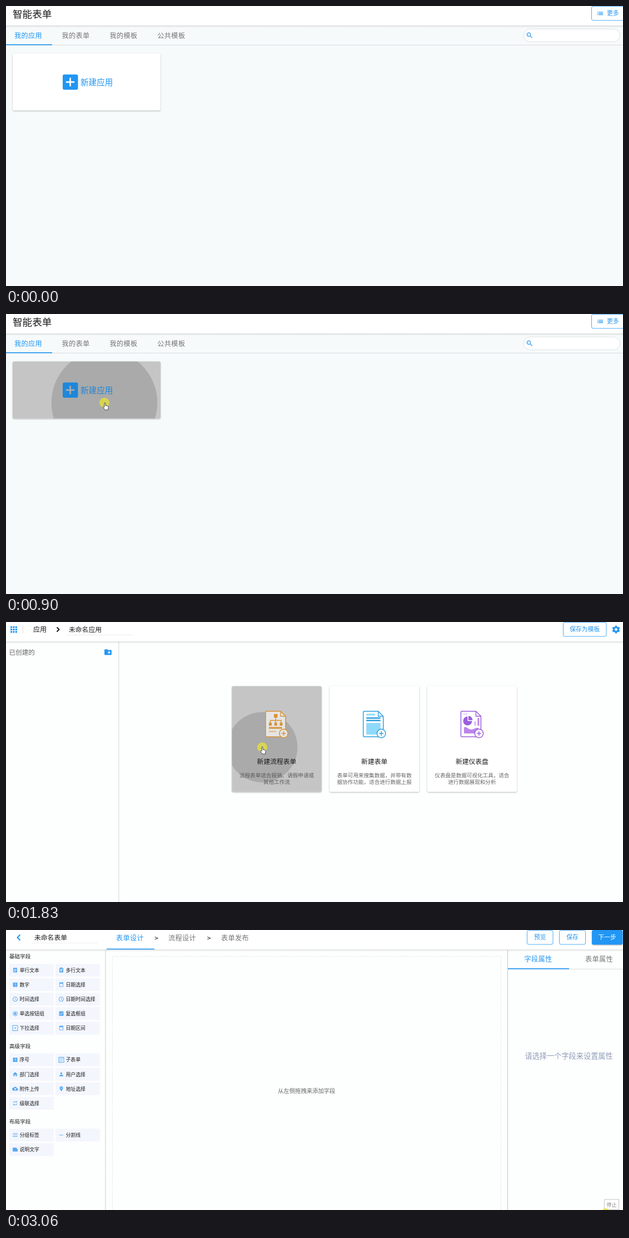
An HTML page for the animation above (3140 ms loop, 1110x505 px).

```html
<!DOCTYPE html>
<html lang="zh-CN">
<head>
<meta charset="utf-8">
<style>
  html, body { margin: 0; width: 100%; height: 100%; overflow: hidden; background: #fff; }
  #stage { display: block; }
  text { font-family: "Noto Sans CJK SC", "Noto Sans CJK", "Noto Sans", sans-serif; font-weight: 300; }
  .paper { filter: drop-shadow(0 1px 1px rgba(0, 0, 0, .28)); }
</style>
</head>
<body>
<svg id="stage" width="1110" height="505" viewBox="0 0 1110 505"></svg>
<script>
const LOOP = 3140;
const BLUE = '#2196f3', INK = '#1c1c1c', GRAY = '#757575', RULE = '#dcdcdc';

// ---------- drawing helpers: each returns SVG markup ----------
const rect = (x, y, w, h, fill, extra = '') =>
  `<rect x="${x}" y="${y}" width="${w}" height="${h}" fill="${fill}" ${extra}/>`;
const circle = (x, y, r, fill, extra = '') =>
  `<circle cx="${x}" cy="${y}" r="${r}" fill="${fill}" ${extra}/>`;
const line = (d, stroke, width = 1, extra = '') =>
  `<path d="${d}" fill="none" stroke="${stroke}" stroke-width="${width}" ${extra}/>`;
const shape = (d, fill) => `<path d="${d}" fill="${fill}" fill-rule="evenodd"/>`;

// cy is the visual middle of the characters
const text = (str, x, cy, size, fill = INK, anchor = 'start', extra = '') =>
  `<text x="${x}" y="${cy + size * 0.38}" font-size="${size}" fill="${fill}" text-anchor="${anchor}" ${extra}>${str}</text>`;
const tab = (str, x, cy, fill) => text(str, x, cy, 12.2, fill, 'start', 'letter-spacing=".35"');

const icon = (name, cx, cy, size, fill = BLUE) =>
  `<g transform="translate(${cx - size / 2} ${cy - size / 2}) scale(${size / 24})">${shape(ICONS[name], fill)}</g>`;
const outlineButton = (str, x, w, size = 10.8) =>
  rect(x, 0.5, w, 25.5, '#fff', `rx="3" stroke="${BLUE}" stroke-opacity=".8"`) +
  text(str, x + w / 2, 13.3, size, BLUE, 'middle');
const header = () => rect(0, 0, 1110, 35, '#fff') + rect(0, 35, 1110, 4, 'url(#shade)');

// A card that darkens under its content and shows a growing ripple when pressed
const card = (id, x, y, w, h, content, rippleX = 0, rippleY = 0) => `
  ${rect(x, y, w, h, '#fff', 'rx="3" class="paper"')}
  <svg id="${id}-under" x="${x}" y="${y}" width="${w}" height="${h}">
    ${rect(0, 0, w, h, '#000', 'rx="3" opacity=".14"')}
    ${circle(rippleX - x, rippleY - y, 0, '#000', `id="${id}-ripple" opacity=".137"`)}
  </svg>
  ${content}
  ${rect(x, y, w, h, '#000', `rx="3" opacity=".1" id="${id}-over"`)}`;

const RING = 'M12 2a10 10 0 1 0 .01 0zm0 2a8 8 0 1 1-.01 0z';
const FRAME = 'M1 1h22v22H1zM3 3v18h18V3z';
const ICONS = {
  list: 'M1 6h3v2.5H1zm5 0h17v2.5H6zM1 11h3v2.5H1zm5 0h17v2.5H6zM1 16h3v2.5H1zm5 0h17v2.5H6z',
  search: 'M15.5 14h-.8l-.3-.3A6.5 6.5 0 1 0 13.7 14.4l.3.3v.8l5 5 1.5-1.5zm-6 0a4.5 4.5 0 1 1 .01 0z',
  folder: 'M20 6h-8l-2-2H4a2 2 0 0 0-2 2v12a2 2 0 0 0 2 2h16a2 2 0 0 0 2-2V8a2 2 0 0 0-2-2zm-1 8h-3v3h-2v-3h-3v-2h3V9h2v3h3z',
  event: 'M20 3h-3V1h-2v2H9V1H7v2H4v18h16zM7 8h10v2H7zm0 4h10v2H7zm0 4h6v2H7z',
  clip: 'M20 3h-5a3 3 0 0 0-6 0H4v18h16zM7 7h10v2H7zm0 4h10v2H7zm0 4h7v2H7z',
  one: 'M3 3h18v18H3zM10 7v2h2v8h2V7z',
  calendar: 'M20 3h-3V1h-2v2H9V1H7v2H4v18h16zM6 8h12v11H6z',
  clock: RING + 'M11 7h1.5v5.2l4.5 2.7-.8 1.2L11 13z',
  radio: RING + 'M12 7a5 5 0 1 0 .01 0z',
  check: 'M3 3h18v18H3zM10 17l9-9-1.4-1.4-7.6 7.6-3.6-3.6L5 12z',
  select: FRAME + 'M7 10h10l-5 5z',
  subform: FRAME + 'M5 6h5v2H5zm7 0h7v2h-7zM5 11h5v2H5zm7 0h7v2h-7zM5 16h9v2H5z',
  home: 'M10 20v-6h4v6h5v-8h3L12 3 2 12h3v8z',
  person: 'M12 12a4 4 0 1 0 0-8 4 4 0 0 0 0 8zm0 2c-2.7 0-8 1.3-8 4v2h16v-2c0-2.7-5.3-4-8-4z',
  upload: 'M19.4 10A7.5 7.5 0 0 0 5.4 8 6 6 0 0 0 6 20h13a5 5 0 0 0 .4-10zM14 13v4h-4v-4H7l5-5 5 5z',
  place: 'M12 2a7 7 0 0 0-7 7c0 5.3 7 13 7 13s7-7.7 7-13a7 7 0 0 0-7-7zm0 9.5a2.5 2.5 0 1 1 .01 0z',
  repeat: 'M7 7h10v3l4-4-4-4v3H5v6h2zm10 10H7v-3l-4 4 4 4v-3h12v-6h-2z',
  lines: 'M2 5h20v2H2zm0 6h20v2H2zm0 6h20v2H2z',
  minus: 'M4 11h16v2H4z',
  note: 'M2 4h14l6 6v10H2z'
};

// ---------- scene 1: application list ----------
function homeScene() {
  const newApp =
    shape('M105 123.5h21.5a3 3 0 0 1 3 3v21.5a3 3 0 0 1-3 3h-21.5a3 3 0 0 1-3-3v-21.5a3 3 0 0 1 3-3z' +
          'M114.2 129.5v6.3h-6.3v2.7h6.3v6.3h2.7v-6.3h6.3v-2.7h-6.3v-6.3z', BLUE) +
    text('新建应用', 134, 137.3, 14.6, BLUE);
  return rect(0, 0, 1110, 505, '#f6fafb') + header() +
    text('智能表单', 12, 14.3, 17.6) +
    rect(1053.5, 0.5, 70, 25.5, '#fff', `rx="3" stroke="${BLUE}" stroke-opacity=".8"`) +
    icon('list', 1069, 13.2, 11) + text('更多', 1081, 13.3, 10.8, BLUE) +
    tab('我的应用', 15, 53.5, BLUE) +
    ['我的表单', '我的模板', '公共模板'].map((s, i) => tab(s, 100.5 + i * 85.9, 53.5, GRAY)).join('') +
    line('M0 70.5H1110', RULE) + rect(0, 69, 83, 1.6, BLUE) +
    rect(931.5, 41.5, 173, 23, '#fff', 'rx="11.5" stroke="#e0e3e4"') + icon('search', 942, 53, 14) +
    card('app', 12, 85.5, 266, 103, newApp, 177, 160);
}

// ---------- scene 2: choose what to create ----------
function documentIcon(x, color, content) {
  return `<g transform="translate(${x} 161)">
    <path d="M2 0H27L36 9V44a2 2 0 0 1-2 2H2a2 2 0 0 1-2-2V2a2 2 0 0 1 2-2z" fill="#fff" stroke="${color}" stroke-width="1.5"/>
    ${line('M27 0V9H36', color, 1.4)}${content}
    ${circle(32.5, 40, 7.7, '#fff', `stroke="${color}" stroke-width="1.5"`)}
    ${line('M28.5 40h8M32.5 36v8', color, 1.5)}</g>`;
}

const flowIcon = c => rect(15, 5, 6.5, 6.5, c) + line('M18.2 11V22M8.5 22V16.5H28V22', c, 1.4) +
  [6, 15.7, 25.5].map(x => rect(x, 20.5, 5, 5.5, c)).join('') +
  rect(6, 28.5, 23.5, 3, c) + rect(6, 35, 13, 3, '#fbdcae');
const formIcon = c => rect(5.5, 4.5, 16, 3, '#90d9fa') + rect(5.5, 11, 25.5, 2.5, c) +
  rect(5.5, 15.5, 25.5, 2.5, c) + rect(5.5, 21, 25.5, 21, '#90d9fa');
const chartIcon = c => circle(6, 5, 1.3, '#d9b8f3') + circle(10, 5, 1.3, '#d9b8f3') +
  shape('M12 9.5a8 8 0 1 0 8 8H12z', c) + shape('M13.5 8.5a7.5 7.5 0 0 1 7.5 7.5h-7.5z', c) +
  rect(24, 18, 3, 8, '#d9b8f3') + rect(30, 12, 3, 14, '#bd85ea') +
  shape('M5.5 29c5-2 8 4 13 4s8-4 13-3V40H5.5z', '#bd85ea');

function chooseScene() {
  const choices = [
    ['新建流程表单', '#f0a33c', flowIcon, '流程表单适合报销、请假申请或', '其他工作流'],
    ['新建表单', '#2d9fe0', formIcon, '表单可用来搜集数据，并带有数', '据协作功能，适合进行数据上报'],
    ['新建仪表盘', '#9b5fdc', chartIcon, '仪表盘是数据可视化工具，适合', '进行数据展现和分析']
  ];
  const dots = [0, 1, 2].flatMap(r => [0, 1, 2].map(c => rect(8 + c * 4.4, 7.7 + r * 4.3, 3.1, 3.1, BLUE))).join('');
  const gear = circle(1097.5, 13.5, 4, 'none', `stroke="${BLUE}" stroke-width="3.2"`) +
    circle(1097.5, 13.5, 6, 'none', `stroke="${BLUE}" stroke-width="2.2" pathLength="12" stroke-dasharray="1 1" stroke-dashoffset="-.5"`);
  return rect(0, 0, 1110, 505, '#fdfefe') + line('M202.8 36V505', RULE, 1.2) + header() +
    dots + line('M30.5 7V20', RULE) + text('应用', 49, 13.3, 12.1) +
    line('M91.5 9.5l4 4-4 4', '#111', 1.8) +
    text('未命名应用', 113, 13.5, 11.8) + line('M109 23.5H228', '#ececec') +
    outlineButton('保存为模板', 1002.5, 77.5) + gear +
    text('已创建的', 5.5, 55, 11.6, '#666') + icon('folder', 183.5, 54.3, 15.4) +
    choices.map(([title, color, draw, a, b], i) => {
      const x = 406.3 + i * 175.7, mid = x + 80.7;
      return card('choice' + i, x, 115.5, 161.5, 191,
        documentIcon(x + 60.7, color, draw(color)) + text(title, mid, 251.3, 11.8, INK, 'middle') +
        text(a, mid, 276.3, 9.58, '#666', 'middle') + text(b, mid, 288.5, 9.58, '#666', 'middle'), 461, 226);
    }).join('') +
    `<g id="status">${rect(-4, 502, 376, 8, '#dcdedf', 'rx="3"')}</g>`;
}

// ---------- scene 3: form designer ----------
function designScene() {
  const sections = [
    ['基础字段', 47.7, 61, 'event 单行文本 clip 多行文本 one 数字 calendar 日期选择 clock 时间选择 clock 日期时间选择 radio 单选按钮组 check 复选框组 select 下拉选择 calendar 日期区间'],
    ['高级字段', 209.3, 222.6, 'one 序号 subform 子表单 home 部门选择 person 用户选择 upload 附件上传 place 地址选择 repeat 级联选择'],
    ['布局字段', 345.3, 358.4, 'lines 分组标签 minus 分割线 note 说明文字']
  ];
  const fields = sections.map(([title, cy, top, list]) => {
    const words = list.split(' ');
    let out = text(title, 6, cy, 9.6);
    for (let i = 0; i < words.length / 2; i++) {
      const x = 6 + (i % 2) * 83, y = top + (i >> 1) * 26.1;
      const name = words[2 * i], size = name === 'select' || name === 'subform' ? 11 : 10.5;
      out += rect(x, y, 80, 23, '#f3f6fd') + icon(name, x + 10.5, y + 11.5, size, '#55a8f3') +
        text(words[2 * i + 1], x + 18.5, y + 11.5, 8.9);
    }
    return out;
  }).join('');
  return rect(0, 0, 1110, 505, '#fdfefe') + line('M179 36V505', '#d4d4d4', 1.2) +
    line('M902.5 36V505', '#c4c4c4') + header() +
    line('M25.5 8.5l-5 5 5 5', BLUE, 2) + text('未命名表单', 51, 13.7, 11.8) +
    line('M47 23.5H165', '#ddd', 1, 'stroke-dasharray="1 1"') +
    tab('表单设计', 198, 14.3, BLUE) + rect(181, 33.6, 86, 1.6, BLUE) +
    tab('流程设计', 292, 14.3, GRAY) + tab('表单发布', 387, 14.3, GRAY) +
    text('&gt;', 270.5, 14, 12, '#111', 'middle') + text('&gt;', 365, 14, 12, '#111', 'middle') +
    outlineButton('预览', 937.5, 46.5) + outlineButton('保存', 995.5, 47) +
    rect(1054, 0, 55.5, 26.5, BLUE, 'rx="3" class="paper"') + text('下一步', 1081.5, 13.3, 10.8, '#fff', 'middle') +
    fields +
    line('M191.5 510V47.5H890.5V510', '#e0e0e0', 1, 'stroke-dasharray="2 2"') +
    text('从左侧拖拽来添加字段', 489, 290.3, 10.35, '#666') +
    tab('字段属性', 932.5, 52.3, BLUE) + tab('表单属性', 1042, 52.3, GRAY) +
    line('M903 70.5H1110', RULE) + rect(903, 69, 110, 1.6, BLUE) +
    text('请选择一个字段来设置属性', 933.5, 227, 13.2, '#8f9db8') +
    `<g id="tip">${rect(1076.5, 486, 26, 18.5, '#fff', 'stroke="#c4c4c4"')}${text('停止', 1089.5, 495.5, 9, '#888', 'middle')}</g>`;
}

const ARROW = 'M0 0V9.5L2.2 7.5L3.8 11L5.3 10.3L3.7 7H6.7z';
const HAND = 'M-1 1C-1-.5 1-.5 1 1V5L5 6C6.2 6.3 6.3 7 6.2 8L5.5 13H0L-3.3 8.5C-4 7.2-2.7 6.6-1.9 7.4L-1 8.3z';

const stage = document.getElementById('stage');
stage.innerHTML = `
  <defs><linearGradient id="shade" x2="0" y2="1">
    <stop stop-color="#000" stop-opacity=".12"/><stop offset="1" stop-color="#000" stop-opacity="0"/>
  </linearGradient></defs>
  <g id="home">${homeScene()}</g><g id="choose">${chooseScene()}</g><g id="design">${designScene()}</g>
  ${circle(0, 0, 9, '#e4e03c', 'id="click" opacity=".8"')}
  <g id="cursor" stroke="#333a4d" stroke-width=".9" stroke-linejoin="round">
    <path id="arrow" d="${ARROW}" fill="#fff"/><path id="hand" d="${HAND}" fill="#fff"/>
  </g>`;

// ---------- motion ----------
const el = id => document.getElementById(id);
const show = (id, on) => el(id).setAttribute('display', on ? 'inline' : 'none');
const place = (id, x, y) => el(id).setAttribute('transform', `translate(${x} ${y})`);

const CHOOSE_AT = 910, DESIGN_AT = 1835;

// time, x, y of the pointer tip
const PATH = [
  [70, 1060, 496], [460, 111, 132], [640, 178, 160], [CHOOSE_AT, 178, 160], [1210, 274, 186],
  [1600, 461, 225], [DESIGN_AT, 461, 225], [1910, 511, 231], [2220, 1028, 440], [2640, 1068, 508]
];

function pointerAt(t) {
  const i = PATH.findIndex(p => p[0] > t);
  if (i < 1) return null;
  const [t0, x0, y0] = PATH[i - 1], [t1, x1, y1] = PATH[i];
  const u = (t - t0) / (t1 - t0), e = u * u * (3 - 2 * u);
  return [x0 + (x1 - x0) * e, y0 + (y1 - y0) * e];
}

function press(id, t, start, rippleStart) {
  const on = t >= start;
  show(id + '-under', on);
  show(id + '-over', on);
  el(id + '-ripple').setAttribute('r', Math.max(0, t - rippleStart) * 0.42);
}

['choice1', 'choice2'].forEach(id => press(id, 0, 1, 1));

function draw(t) {
  show('home', t < CHOOSE_AT);
  show('choose', t >= CHOOSE_AT && t < DESIGN_AT);
  show('design', t >= DESIGN_AT);
  press('app', t, 655, 674);
  press('choice0', t, 1640, 1680);
  show('status', t < 1290);
  show('tip', t >= 2830);

  const pointer = pointerAt(t);
  show('cursor', pointer);
  if (pointer) {
    const [x, y] = pointer;
    const overApp = t < CHOOSE_AT && x < 278 && y < 188;
    const overChoice = t > CHOOSE_AT && t < DESIGN_AT && x > 406 && x < 568;
    place('cursor', x, y);
    show('hand', overApp || overChoice);
    show('arrow', !overApp && !overChoice);
  }

  const clicks = [[655, CHOOSE_AT, 177, 160], [1640, DESIGN_AT, 461, 226], [2980, LOOP, 1079, 511]];
  const click = clicks.find(([from, to]) => t >= from && t < to);
  show('click', click);
  if (click) place('click', click[2], click[3]);
}

function tick() {
  draw(performance.now() % LOOP);
  requestAnimationFrame(tick);
}
tick();
</script>
</body>
</html>
```
